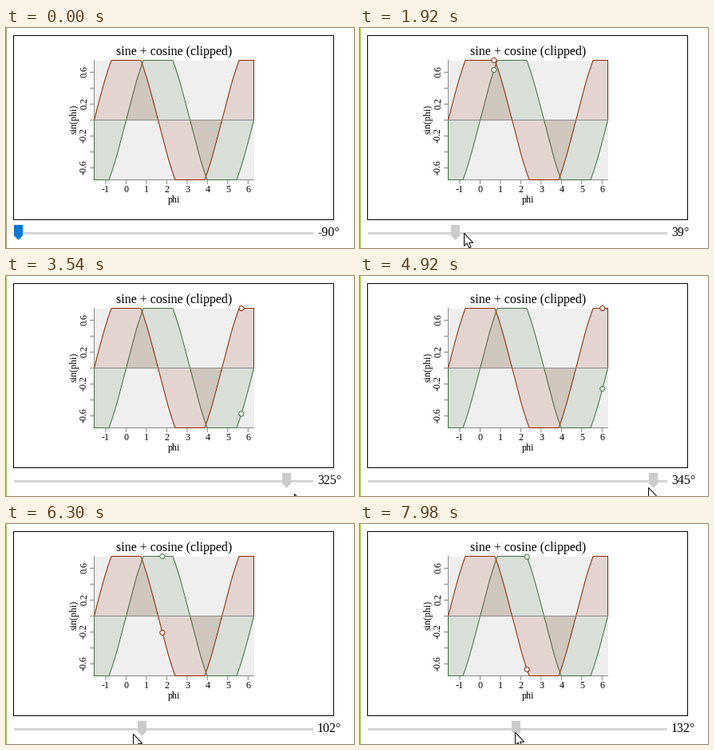
A matplotlib script that plays this animation: 436 px wide and 276 px high, repeating every 8 s.

```python
import numpy as np
import matplotlib.pyplot as plt
from matplotlib.animation import FuncAnimation
from matplotlib.patches import Circle, Polygon, Rectangle

W, H, DPI = 436, 276, 64
PT = 72 / DPI                                   # points per pixel
LOOP, TICK, STEP = 8000, 20, 60                 # ms
ENTER, HOVER, ARRIVE, PRESS, RETURN = 120, 660, 900, 1380, 4620
GREEN, RED, GREY = "#426F42", "#8B2500", "#888888"
LEFT, RIGHT, TOP, MID, BOTTOM = 110.5, 310.5, 40.5, 115.5, 190.5
LIMIT = 0.75

plt.rcParams["font.family"] = "Liberation Serif"
plt.rcParams["path.snap"] = False
fig = plt.figure(figsize=(W / DPI, H / DPI), dpi=DPI, facecolor="white")
ax = fig.add_axes([0, 0, 1, 1])
ax.set_xlim(0, W)
ax.set_ylim(H, 0)
ax.axis("off")


def place(patch):
    patch.set_zorder(len(ax.get_children()))
    return ax.add_patch(patch)


def rect(x, y, w, h, color):
    return place(Rectangle((x, y), w, h, fc=color, ec="none"))


def poly(pts, fc, ec="none", **kw):
    return place(Polygon(pts, fc=fc, ec=ec, lw=PT, **kw))


def line(x, y, color):
    ax.plot(x, y, color=color, lw=PT, zorder=len(ax.get_children()))


def text(x, y, s, px, ha="center", rot=0):
    return ax.text(x, y, s, fontsize=px * PT, ha=ha, va="baseline", rotation=rot,
                   rotation_mode="anchor", zorder=len(ax.get_children()))


def px_x(phi):
    return 150.5 + phi * (RIGHT - LEFT) / (2.5 * np.pi)


def px_y(v):
    return MID - 100 * np.clip(v, -LIMIT, LIMIT)


def thumb_x(deg):
    return 15.5 + 364 * (deg + 90) / 450


# slider angle at a few moments of the drag
KEY_T, KEY_DEG = np.array([
    (PRESS, -85), (1920, 39), (2760, 222), (3540, 325), (3660, 346), (4020, 346),
    (4320, 360), (4680, 360), (5460, 261), (6300, 102), (6600, 46), (7140, 112),
    (7560, 132), (LOOP, 132)], float).T
GAP = np.diff(KEY_T)
RATE = np.diff(KEY_DEG) / GAP
TURN = RATE[:-1] * RATE[1:] <= 0
MEAN = 2 * RATE[:-1] * RATE[1:] / np.where(TURN, 1, RATE[:-1] + RATE[1:])
SLOPE = np.r_[RATE[0], np.where(TURN, 0, MEAN), 0]


def angle(t):
    """Cubic Hermite curve through the keys, flat at turns and holds."""
    t = np.clip(t, PRESS, LOOP - 1)
    i = np.searchsorted(KEY_T, t, "right") - 1
    s = (t - KEY_T[i]) / GAP[i]
    ease = s * s * (3 - 2 * s)
    bend = s * (1 - s) * (SLOPE[i] * (1 - s) - SLOPE[i + 1] * s)
    return KEY_DEG[i] + (KEY_DEG[i + 1] - KEY_DEG[i]) * ease + GAP[i] * bend


def pointer(t):
    # the pointer leads the thumb by one step
    x = thumb_x(angle(t + STEP))
    y = max(255, 248 + 0.07 * x) if t < RETURN else 265 - (t - RETURN) / 840
    away = 1 - np.clip((t - ENTER) / (ARRIVE - ENTER), 0, 1)
    return round(x + 344 * away ** 2.7), round(y - 131 * away ** 3.5)


# page and chart
edge = rect(0, 0, 1, H, "#9c9c4c")
line([9.5, 410.5, 410.5, 9.5, 9.5], [9.5, 9.5, 240.5, 240.5, 9.5], "black")
rect(LEFT + 0.5, TOP + 0.5, 200, 149, "#efefef")
text(210.5, 34, "sine + cosine (clipped)", 16)
text(210.5, 219, "phi", 12)
text(88, MID - 1, "sin(phi)", 12, rot=90)
for n in range(-1, 7):
    line([px_x(n)] * 2, [191.5, 195.5], GREY)
    text(px_x(n), 206, str(n), 12)
for n in range(-3, 4):
    y = px_y(n / 5)
    line([105.5, 109.5], [y, y], GREY)
    if n % 2:
        text(101, y - 1, f"{n / 5:.1f}", 12, rot=90)
line([LEFT, LEFT, RIGHT], [TOP, BOTTOM, BOTTOM], GREY)

phi = np.linspace(-np.pi / 2, 2 * np.pi, 361)
waves = ((np.sin, GREEN), (np.cos, RED))
for f, color in waves:
    xs = np.r_[LEFT, px_x(phi), RIGHT]
    ys = np.r_[MID, px_y(f(phi)), MID]
    poly(np.c_[xs, ys], color, alpha=0.125)
    line(xs, ys, color)
line([LEFT, RIGHT], [MID, MID], GREY)
dots = [(f, place(Circle((0, 0), 3, fc="white", ec=c, lw=PT))) for f, c in waves]

# slider
THUMB = np.array([(-5.5, 247), (5.5, 247), (5.5, 260.5), (0, 266), (-5.5, 260.5)])
ARROW = np.array([(0, 0), (0, 16), (3.6, 12.7), (6.2, 18.3), (8.6, 17.3),
                  (6.1, 11.8), (11.2, 11.8)])
rect(10, 256, 375, 3, "#d4d4d4")
thumb = poly(THUMB, "#0078d7")
label = text(390, 261, "", 16, ha="left")
arrow = poly(ARROW, "white", "black")


def draw(i):
    t = i * TICK // STEP * STEP
    held = t >= PRESS
    deg = round(angle(t)) if held else -90
    edge.set_facecolor("#9ccc3c" if held else "#9c9c4c")
    thumb.set_xy(THUMB + [np.floor(thumb_x(deg)) + 0.5, 0])
    thumb.set_facecolor("#cccccc" if held else "#171717" if t >= HOVER else "#0078d7")
    label.set_text(f"{deg:.0f}°")
    a = np.radians(deg)
    for f, dot in dots:
        dot.set_center((px_x(a), px_y(f(a))))
        dot.set_visible(held)
    x, y = pointer(t)
    arrow.set_xy(ARROW + [x - 0.5, y + 0.5])
    arrow.set_visible(t >= ENTER)
    return [edge, thumb, label, arrow] + [dot for _, dot in dots]


anim = FuncAnimation(fig, draw, frames=LOOP // TICK, interval=TICK, repeat=True,
                     repeat_delay=0, blit=False)
plt.show()
```
